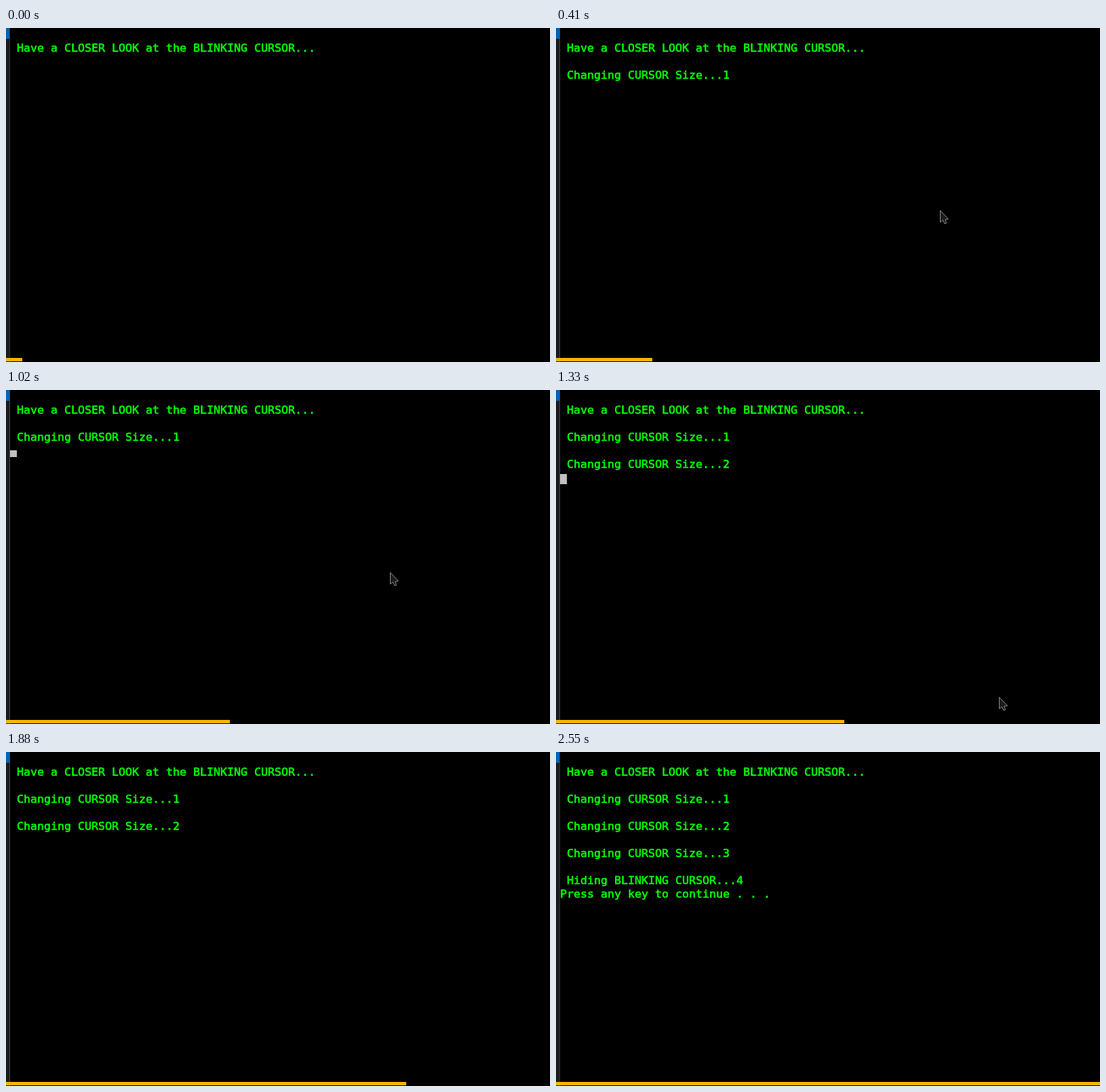
An HTML page with a canvas for the animation above (2630 ms loop, 802 px wide and 493 px high).

```html
<!DOCTYPE html>
<html lang="en">
<head>
<meta charset="utf-8">
<title>Blinking cursor</title>
<style>
  html, body { margin: 0; width: 100%; height: 100%; overflow: hidden; background: #000; }
  canvas { display: block; }
</style>
</head>
<body>
<canvas id="stage" width="802" height="493"></canvas>
<script>
const W = 802, H = 493, LOOP = 2630;
const COUNT = 34, STEP = 77;
const COL = 10, ROW = 20, LEFT = 6;
const BLINK = 545;
const ctx = document.getElementById('stage').getContext('2d');

// Each stage prints its lines two rows below the last one
const STAGES = [
  { at: 0, size: 0, lines: [' Have a CLOSER LOOK at the BLINKING CURSOR...'] },
  { at: 230, size: 10, lines: [' Changing CURSOR Size...1'] },
  { at: 1230, size: 15, lines: [' Changing CURSOR Size...2'] },
  { at: 2070, size: 20, lines: [' Changing CURSOR Size...3'] },
  { at: 2380, size: 0, lines: [' Hiding BLINKING CURSOR...4', 'Press any key to continue . . .'] }
];
const ARROW = new Path2D('M.5 .5V17.5L4.5 14.5L7 20L9.5 19L8 13.5L12.5 13Z');

function rect(color, x, y, w, h) {
  ctx.fillStyle = color;
  ctx.fillRect(x, y, w, h);
}

// Strip of the window behind, with the edge of this one
function drawStrip(focused) {
  rect('#1b1b1b', 0, 0, 5, H);
  rect('#0063b1', 0, 0, 5, 16);
  rect(focused ? '#484848' : '#343434', 5, 0, 1, H);
}

function drawText(text, row) {
  const y = row * ROW + 15;
  ctx.font = '16.61px "DejaVu Sans Mono", monospace';
  ctx.fillStyle = ctx.strokeStyle = '#00ff00';
  ctx.lineWidth = 0.65;
  ctx.lineJoin = 'round';
  ctx.fillText(text, LEFT, y);
  ctx.strokeText(text, LEFT, y);
}

function drawStages(t) {
  const shown = STAGES.filter(s => s.at <= t);
  shown.forEach((s, i) => s.lines.forEach((text, j) => drawText(text, 2 * i + 1 + j)));

  const { size } = shown[shown.length - 1];
  const lit = Math.floor((t + 220) / BLINK) % 2 === 0;
  if (lit) rect('#c0c0c0', LEFT, (2 * shown.length + 1) * ROW - 1 - size, COL, size);
}

// Slides in from the lower right, rests, and leaves the same way
function drawPointer(t) {
  const away = Math.max(0, (320 - t) / 275, (t - 1100) / 230);
  if (away > 1) return;
  ctx.save();
  ctx.translate(Math.round(566 + 96 * away), Math.round(269 + 203 * away));
  ctx.fillStyle = '#1c1c1c';
  ctx.strokeStyle = '#8c8c8c';
  ctx.lineWidth = 1;
  ctx.fill(ARROW);
  ctx.stroke(ARROW);
  ctx.restore();
}

function draw(step) {
  const t = step * STEP;
  rect('#000', 0, 0, W, H);
  drawStrip(t > 150 && t < 2380);
  drawStages(t);
  drawPointer(t);
  rect('#ffb400', 0, 487, Math.round(W * (step + 1) / COUNT), 5);
}

const origin = performance.now();
function tick() {
  const t = (performance.now() - origin) % LOOP;
  draw(Math.min(COUNT - 1, Math.floor(t / STEP + 0.1)));
  requestAnimationFrame(tick);
}
tick();
</script>
</body>
</html>
```
